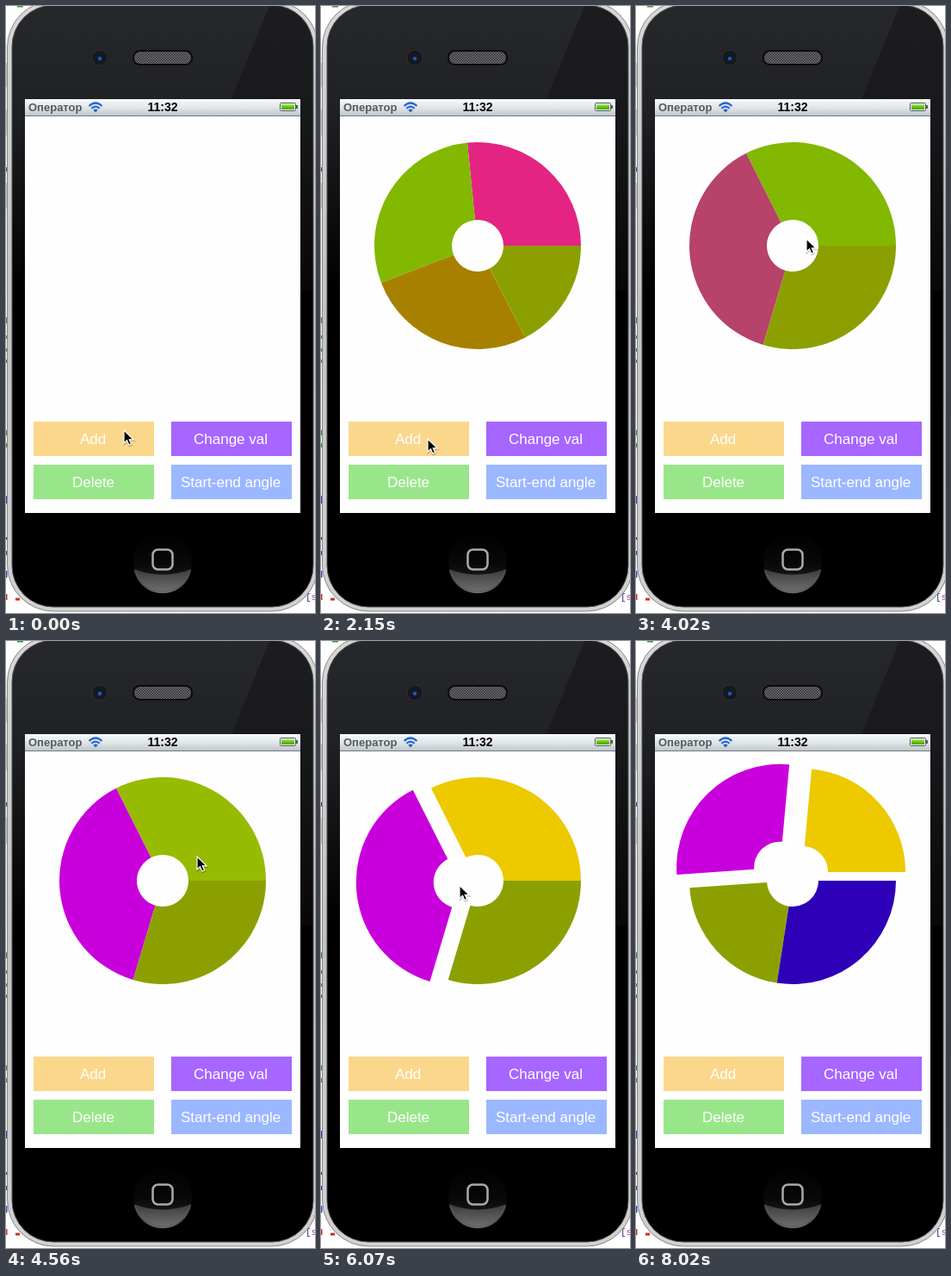
Write an HTML page that moves like this. It is 359 px wide and 704 px high and loops after 8350 ms.

```html
<!DOCTYPE html>
<html lang="en">
<head>
<meta charset="utf-8">
<title>Pie chart demo</title>
<style>
  html, body { margin: 0; width: 100%; height: 100%; overflow: hidden; background: #fff; }
  svg { display: block; font-family: "Liberation Sans", Arial, sans-serif; }
  .button { font-size: 17px; fill: #fff; text-anchor: middle; }
  .status { font-weight: bold; }
  .code { font: 11px "Liberation Mono", monospace; }
</style>
</head>
<body>
<svg width="359" height="704" viewBox="0 0 359 704">
  <defs>
    <linearGradient id="metal" x2="0" y2="1">
      <stop offset="0" stop-color="#d8d8d8"/><stop offset=".5" stop-color="#c2c2c2"/><stop offset="1" stop-color="#d2d2d2"/>
    </linearGradient>
    <linearGradient id="gloss" gradientUnits="userSpaceOnUse" x1="0" y1="0" x2="0" y2="330">
      <stop offset="0" stop-color="#27282c"/><stop offset=".36" stop-color="#202125"/><stop offset="1" stop-color="#000"/>
    </linearGradient>
    <linearGradient id="bar" x2="0" y2="1">
      <stop offset="0" stop-color="#f7f9fa"/><stop offset=".5" stop-color="#e0e5e8"/><stop offset="1" stop-color="#bcc4c9"/>
    </linearGradient>
    <linearGradient id="charge" x2="0" y2="1">
      <stop offset="0" stop-color="#b5ec75"/><stop offset=".5" stop-color="#5fc60d"/><stop offset="1" stop-color="#4aa508"/>
    </linearGradient>
    <linearGradient id="home" x2="0" y2="1">
      <stop offset="0" stop-color="#000"/><stop offset=".55" stop-color="#080808"/><stop offset="1" stop-color="#252525"/>
    </linearGradient>
    <linearGradient id="rim" x2="0" y2="1">
      <stop offset="0" stop-color="#4a4a4a"/><stop offset="1" stop-color="#8a8a8a"/>
    </linearGradient>
    <pattern id="mesh" width="3" height="3" patternUnits="userSpaceOnUse">
      <path d="M0 0h3v3h-3z" fill="#2c2c2e"/><path d="M0 0h1.5v1.5h-1.5zM1.5 1.5h1.5v1.5h-1.5z" fill="#77777a"/>
    </pattern>
    <clipPath id="body"><rect x="8" y="0" width="348" height="697" rx="46"/></clipPath>
  </defs>

  <!-- Editor window peeking out behind the phone -->
  <path d="M0 617.5H359" stroke="#444" stroke-width="3"/>
  <path d="M0 66v28M0 120v30M0 205v30" stroke="#ccc" stroke-width="2"/>
  <path d="M0 187v5M0 568v9M0 632v5M0 655v8" stroke="#3a4cc0" stroke-width="3"/>
  <path d="M0 361v7M0 382v4M0 397v4M0 410v4M0 492v6M0 507v5M13 0h7" stroke="#3a983a" stroke-width="3"/>
  <path d="M0 682v7M11 688h5" stroke="#d0302c" stroke-width="3"/>
  <text class="code" x="348" y="689" fill="#222a80">[<tspan fill="#b030a0">s</tspan></text>

  <!-- Phone -->
  <rect x="1.5" y="-6" width="361" height="708" rx="54" fill="url(#metal)" stroke="#858585"/>
  <rect x="7" y="-1" width="350" height="698" rx="48" fill="url(#gloss)" stroke="#555"/>
  <path d="M306 0L262 108V330H360V0Z" fill="#101113" opacity=".45" clip-path="url(#body)"/>
  <circle cx="109" cy="60" r="9" fill="#17181b" stroke="#303136"/>
  <circle cx="109" cy="60.500" r="5" fill="#111a2c"/>
  <circle cx="109" cy="61" r="2.200" fill="#2b58a8"/>
  <rect x="148" y="52" width="68" height="16" rx="7.500" fill="url(#mesh)" stroke="#0b0b0c" stroke-width="2"/>
  <circle cx="182" cy="643" r="34" fill="url(#home)"/>
  <path d="M148.500 653Q182 666 215.500 653A34 34 0 0 1 148.500 653Z" fill="url(#rim)" opacity=".75"/>
  <path d="M150 655A34 34 0 0 0 214 655" fill="none" stroke="#777" opacity=".5"/>
  <rect x="170.500" y="630.500" width="23" height="23" rx="6" fill="none" stroke="#aaa" stroke-width="2.500"/>

  <!-- Screen -->
  <rect x="22" y="108" width="320" height="480" fill="#fefefe"/>
  <rect x="22" y="108" width="320" height="20" fill="url(#bar)"/>
  <path d="M22 127.500H342" stroke="#727b80"/>
  <g class="status">
    <text x="26" y="122" font-size="13" fill="#555a5f">Оператор</text>
    <text x="182" y="122" font-size="14" text-anchor="middle">11:32</text>
  </g>
  <g fill="none" stroke="#2568d0" stroke-width="2.200">
    <path d="M96.500 116Q104 109 111.500 116M99.300 118.800Q104 114.300 108.700 118.800"/>
    <path d="M104 123.500L101.300 120.700Q104 118.500 106.700 120.700Z" fill="#2568d0" stroke="none"/>
  </g>
  <rect x="318.500" y="112.500" width="18" height="9" rx="1" fill="#eee" stroke="#555b60"/>
  <rect x="320" y="114" width="15" height="6" fill="url(#charge)"/>
  <path d="M338 115v4" stroke="#555b60" stroke-width="2"/>

  <rect x="32" y="482" width="140" height="40" fill="#fbd78b"/>
  <rect x="192" y="482" width="140" height="40" fill="#a666ff"/>
  <rect x="32" y="532" width="140" height="40" fill="#99e68a"/>
  <rect x="192" y="532" width="140" height="40" fill="#9bb7ff"/>
  <g class="button">
    <text x="101" y="508">Add</text>
    <text x="261" y="508">Change val</text>
    <text x="101.500" y="558">Delete</text>
    <text x="261" y="558">Start-end angle</text>
  </g>

  <g id="pie"></g>
  <g id="cursor">
    <path d="M0 0V15L3.500 11.800 5.800 17 8.500 15.800 6.200 10.800H11Z" fill="#000" opacity=".18" stroke="#000" stroke-width="2" transform="translate(.5 1.5)"/>
    <path d="M0 0V15L3.500 11.800 5.800 17 8.500 15.800 6.200 10.800H11Z" stroke="#fff" stroke-width="1.200"/>
  </g>
</svg>

<script>
const LOOP = 8350, FIRST_TICK = 270, TICK = 89, DURATION = 450;
const CENTER = [182, 278], OUTER = 120, INNER = 30;

// Slice weights after each click: [start, weights]
const moves = [
  [213, [91, 0, 0, 0, 0]],
  [516, [91, 100, 0, 0, 0]],
  [1611, [91, 100, 117, 0, 0]],
  [1836, [91, 100, 117, 91.3, 0]],
  [2800, [0, 100, 117, 91.3, 0]],
  [7440, [0, 100, 117, 91.3, 116.5]],
];

const slices = [
  { color: [228, 36, 130] },
  { color: [130, 184, 0], recolor: [4410, [237, 201, 0]], pull: [6120, 15] },
  { color: [168, 128, 0], recolor: [3788, [200, 0, 220]], pull: [5300, 21.3] },
  { color: [139, 160, 0] },
  { color: [46, 0, 184] },
];

// Pointer route: time, x, y
const route = [
  [0, 137, 492], [804, 137, 494], [1070, 134, 501], [1340, 115, 550], [1520, 124, 502],
  [2139, 124, 502], [2490, 120, 561], [3120, 120, 561], [3650, 145, 290], [3830, 145, 290],
  [4008, 198, 270], [4275, 222, 250], [4630, 222, 250], [5165, 137, 298], [5250, 130, 324],
  [5430, 130, 324], [5780, 110, 312], [5960, 110, 312], [6230, 255, 231], [6680, 255, 231],
  [7034, 142, 455], [7300, 130, 496], [7570, 130, 496], [8010, 110, 722], [LOOP, 110, 722],
];

const clamp = x => Math.max(0, Math.min(1, x));
const ease = x => (1 - Math.cos(Math.PI * clamp(x))) / 2;
const progress = (t, start) => ease((t - start) / DURATION);
const mix = (from, to, k) => from.map((v, i) => v + (to[i] - v) * k);

function endAngles(weights) {
  const total = weights.reduce((a, b) => a + b);
  let sum = 0;
  return weights.map(w => (sum += w) / total * 2 * Math.PI);
}

// Each click retargets the angles from wherever they are at that moment.
function anglesAt(t) {
  return moves.reduce((from, [start, weights], i) => {
    const until = Math.min(t, moves[i + 1]?.[0] ?? t);
    return mix(from, endAngles(weights), progress(until, start));
  }, [0, 0, 0, 0, 0]);
}

function slicePath(a, b, pull) {
  if (b - a < 0.002) return '';
  const mid = (a + b) / 2;
  const point = (r, angle) => [
    CENTER[0] + pull * Math.cos(mid) + r * Math.cos(angle),
    CENTER[1] - pull * Math.sin(mid) - r * Math.sin(angle),
  ].map(v => v.toFixed(2));
  const large = +(b - a > Math.PI);
  return `M${point(OUTER, a)}A${OUTER} ${OUTER} 0 ${large} 0 ${point(OUTER, b)}` +
    `L${point(INNER, b)}A${INNER} ${INNER} 0 ${large} 1 ${point(INNER, a)}Z`;
}

function pointerAt(t) {
  const i = Math.max(1, route.findIndex(key => key[0] >= t));
  const [from, to] = [route[i - 1], route[i]];
  return mix(from, to, clamp((t - from[0]) / (to[0] - from[0]))).slice(1);
}

const pie = document.getElementById('pie');
const cursor = document.getElementById('cursor');
for (const slice of slices) {
  slice.path = pie.appendChild(document.createElementNS('http://www.w3.org/2000/svg', 'path'));
}

function draw(t) {
  const ends = anglesAt(t);
  slices.forEach(({ path, color, recolor, pull }, i) => {
    const fill = recolor ? mix(color, recolor[1], progress(t, recolor[0])) : color;
    const offset = pull ? pull[1] * progress(t, pull[0]) : 0;
    path.setAttribute('d', slicePath(ends[i - 1] ?? 0, ends[i], offset));
    path.setAttribute('fill', `rgb(${fill.map(Math.round)})`);
  });
  cursor.setAttribute('transform', `translate(${pointerAt(t)})`);
}

function frame() {
  const t = performance.now() % LOOP;
  draw(Math.max(0, FIRST_TICK + Math.floor((t - FIRST_TICK) / TICK) * TICK));
  requestAnimationFrame(frame);
}
frame();
</script>
</body>
</html>
```
